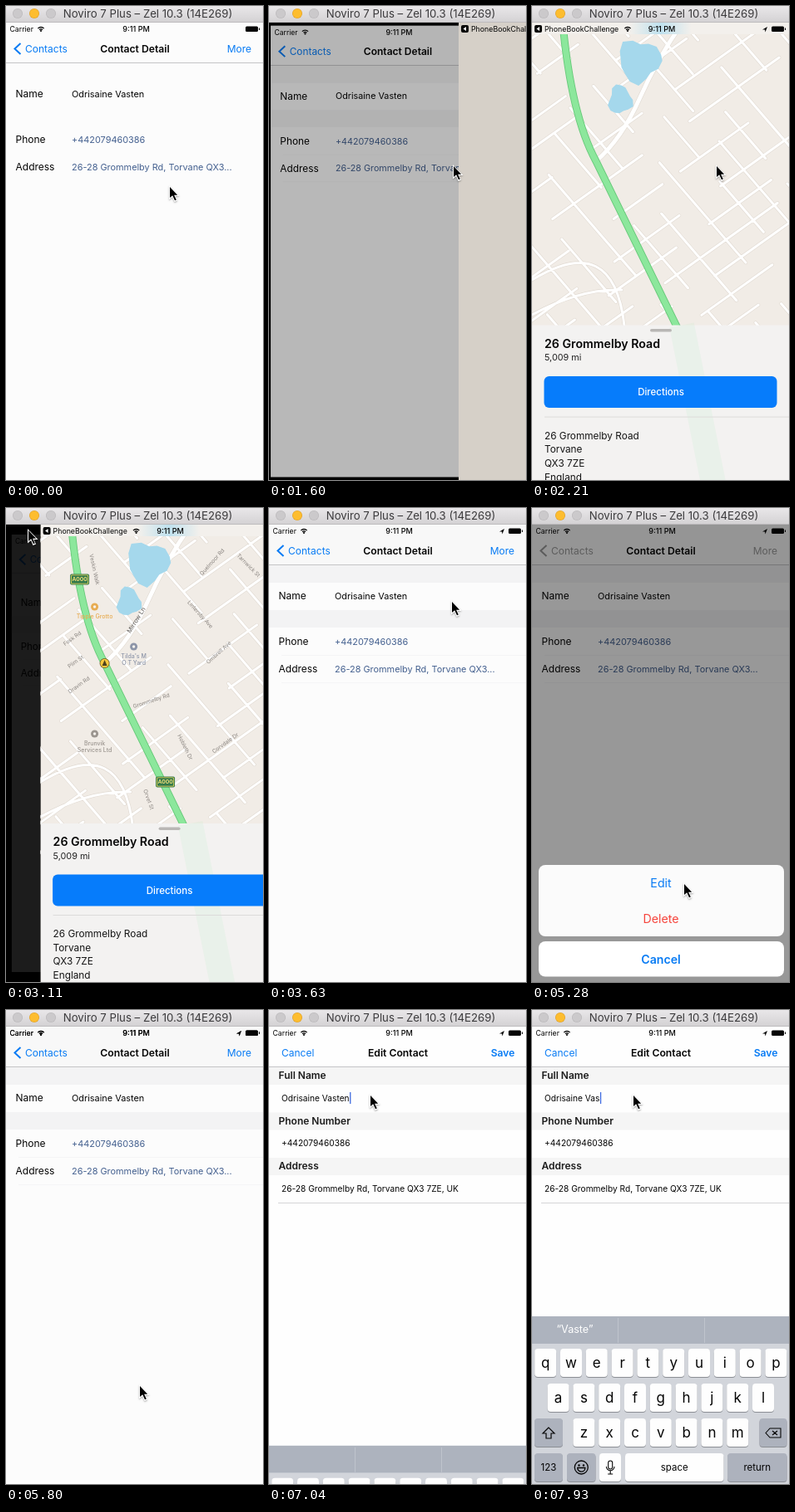
Recreate the animation shown at these times as an HTML page with a canvas. Size 309 px wide and 571 px high, loop 8000 ms.

```html
<!DOCTYPE html>
<html lang="en">
<head>
<meta charset="utf-8">
<title>Contact editing</title>
<style>
html, body { margin: 0; width: 100%; height: 100%; overflow: hidden; background: #fff; }
canvas { display: block; width: 309px; height: 571px; }
</style>
</head>
<body>
<canvas id="stage"></canvas>
<script>
const W = 309, H = 571, TOP = 20, LOOP = 8000, STEP = 87.8;
const OPEN_MAP = 1490, LEAVE_MAP = 3015, TAP_MORE = 4560, OPEN_EDIT = 5787, TAP_NAME = 7020;
const BLUE = '#087bf4', INK = '#050505', LINK = '#44608f';
const canvas = document.getElementById('stage');
const ctx = canvas.getContext('2d');
const ratio = window.devicePixelRatio || 1;
canvas.width = W * ratio;
canvas.height = H * ratio;

const person = 'Odrisaine Vasten';
const phone = '+442079460386';
const street = '26-28 Grommelby Rd, Torvane QX3';

const clamp = v => Math.max(0, Math.min(1, v));
const ramp = (t, from, to) => clamp((t - from) / (to - from));
const mix = (a, b, p) => a + (b - a) * p;
const smooth = v => v * v * (3 - 2 * v);
const easeOut = v => 1 - (1 - v) ** 3;

// Critically damped, settled once the rest is invisible.
function spring(t, start) {
  const k = Math.max(0, t - start) * 0.011;
  const p = 1 - Math.exp(-k) * (1 + k);
  return p > 0.975 ? 1 : p;
}

function randomFrom(seed) {
  return () => (seed = (seed * 16807) % 2147483647) / 2147483647;
}

function rect(x, y, w, h, color) {
  ctx.fillStyle = color;
  ctx.fillRect(x, y, w, h);
}

function pill(x, y, w, h, r, color) {
  ctx.fillStyle = color;
  ctx.beginPath();
  ctx.roundRect(x, y, w, h, r);
  ctx.fill();
}

function disc(x, y, r, color) {
  ctx.fillStyle = color;
  ctx.beginPath();
  ctx.arc(x, y, r, 0, Math.PI * 2);
  ctx.fill();
}

function fill(path, color) {
  ctx.fillStyle = color;
  ctx.fill(new Path2D(path));
}

function stroke(path, color, width) {
  ctx.strokeStyle = color;
  ctx.lineWidth = width;
  ctx.stroke(new Path2D(path));
}

// y is the middle of the capitals.
function text(str, x, y, size, color = INK, align = 'left', weight = 400) {
  ctx.font = `${weight} ${size}px Inter, "Open Sans", sans-serif`;
  ctx.textAlign = align;
  ctx.fillStyle = color;
  ctx.fillText(str, x, y + size * 0.36);
}

function titleBar() {
  const shade = ctx.createLinearGradient(0, 0, 0, TOP);
  shade.addColorStop(0, '#e9e7e9');
  shade.addColorStop(1, '#d3d1d3');
  rect(0, 0, W, TOP, shade);
  rect(0, TOP - 1, W, 1, '#bdbbbd');
  for (let i = 0; i < 3; i++) {
    disc(14 + i * 20, 9, 6, i === 1 ? '#dea02a' : '#b9b7b9');
    disc(14 + i * 20, 9, 5.4, i === 1 ? '#fdbd2f' : '#cbc9cb');
  }
  text('Noviro 7 Plus – Zel 10.3 (14E269)', 170.5, 9.5, 13.2, '#3b3a3c', 'center');
}

function wifi(x) {
  for (const r of [2.6, 5]) {
    stroke(`M${x - r * 0.73} ${30.5 - r * 0.68}A${r} ${r} 0 0 1 ${x + r * 0.73} ${30.5 - r * 0.68}`, INK, 1.3);
  }
  disc(x, 30, 1.1, INK);
}

function clock(x, y) {
  text('9:11 PM', x, y, 9.1, INK, 'center', 500);
}

function battery(x, located) {
  if (located) fill(`M${x - 11} 28.5l6 -3.5l-2.5 6.5l-.5 -3z`, INK);
  pill(x, 24.5, 15, 6.5, 1.5, INK);
  rect(x + 16, 26.5, 1, 2.5, INK);
}

function statusBar(located) {
  text('Carrier', 4.5, 28, 8.7);
  wifi(42);
  clock(156.5, 28);
  battery(288, located);
}

function contactPage(t, dim) {
  const banded = t >= OPEN_MAP;
  rect(0, TOP, W, H, '#fcfcfc');
  rect(0, TOP, W, 48, banded ? '#f8f8f8' : '#fcfcfc');
  rect(0, 68, W, 1, '#c4c4c6');
  if (banded) {
    for (const y of [69, 123]) rect(0, y, W, 21, '#f3f3f4');
    for (const y of [177, 210]) rect(15, y, W, 1, '#f5f5f6');
  }
  const tint = dim > 0.5 ? '#989898' : BLUE;
  stroke('M17.5 45l-7 6.5l7 6.5', tint, 2);
  text('Contacts', 23, 51.5, 12, tint);
  text('Contact Detail', 155, 51.5, 12.2, INK, 'center', 600);
  ctx.globalAlpha = t >= TAP_MORE && t < TAP_MORE + 2 * STEP ? 0.35 : 1;
  text('More', 295, 51.5, 12, tint, 'right');
  ctx.globalAlpha = 1;
  text('Name', 11.5, 106, 12);
  text(person, 79, 106, 10.9);
  text('Phone', 11.5, 161, 12);
  text(phone, 79, 161, 10.9, LINK);
  text('Address', 11.5, 194, 12);
  text(street + '...', 79, 194, 10.9, LINK);
  statusBar(t >= LEAVE_MAP);
}

// Broken streets in two crossing directions.
function streetGrid() {
  const random = randomFrom(29);
  let path = '';
  for (const angle of [-0.62, 0.86]) {
    const c = Math.cos(angle), s = Math.sin(angle);
    for (let side = -220; side < 220; side += 27 + random() * 16) {
      for (let along = -250; along < 250; along += 25 + random() * 50) {
        const end = along + 60 + random() * 110;
        path += `M${195 + along * c - side * s} ${200 + along * s + side * c}` +
          `L${195 + end * c - side * s} ${200 + end * s + side * c}`;
        along = end;
      }
    }
  }
  return path;
}

const roads = streetGrid() + 'M42 330Q140 270 153 385M42 372Q100 340 150 342';
const lane = 'M119 187Q150 160 172 110T230 10';
const highway = 'M78 10Q88 130 119 187L254 464';

function lake(x, y, rx, ry, turn) {
  ctx.beginPath();
  for (let a = 0; a < Math.PI * 2; a += 0.4) {
    const r = 1 + 0.16 * Math.sin(3 * a + turn) + 0.07 * Math.sin(5 * a);
    ctx.lineTo(x + rx * r * Math.cos(a), y + ry * r * Math.sin(a));
  }
  ctx.fillStyle = '#a5d8ec';
  ctx.fill();
}

function streetName(name, x, y, degrees, size = 6.6, color = '#8a8580') {
  ctx.save();
  ctx.translate(x, y);
  ctx.rotate(degrees * Math.PI / 180);
  text(name, 0, 0, size, color, 'center');
  ctx.restore();
}

function shield(x, y) {
  pill(x - 11.5, y - 6.5, 23, 13, 2, '#347a4c');
  pill(x - 10.5, y - 5.5, 21, 11, 1.5, '#f3d85a');
  pill(x - 9.7, y - 4.7, 19.4, 9.4, 1, '#347a4c');
  text('A000', x, y, 6.8, '#f8e27b', 'center', 600);
}

function place(x, y, color, ...names) {
  disc(x, y, 4.5, color);
  disc(x, y, 1.7, '#f6f2ed');
  names.forEach((name, i) => text(name, x, y + 11 + i * 8.5, 7, color, 'center', 500));
}

function mapLabels() {
  ['Fosk Rd', 'Plim St', 'Dravin Rd'].forEach((name, i) =>
    streetName(name, 80 + i * 4, 157 + i * 28, -36));
  ['Quelmoor Rd', 'Ombrell Ave', 'Corvdale Dr'].forEach((name, i) =>
    streetName(name, 248 + i * 8, 65 + i * 109, -48 + i * 6));
  streetName('Tarnwick St', 292, 69, 45);
  streetName('Lintersby Ave', 234, 128, 48);
  streetName('Hobleth Dr', 216, 288, 64);
  streetName('Orvet St', 172, 351, 70);
  streetName('Veskin Walk', 107, 74, 78);
  streetName('Fennickby Rd'.replace('Fennick', 'Grommel'), 175, 232, -18);
  streetName('Mirrow Ln', 157, 135, -58, 7.4, '#55514d');
  shield(89, 86);
  shield(192, 330);
  disc(119, 187, 6, '#6b5b2a');
  disc(119, 187, 5.2, '#f6c93f');
  fill('M116 190l3 -7l3 7z', '#4d421f');
  place(107, 119, '#e7ac52', 'Tipple Grotto');
  place(154, 167, '#8d95a8', "Tilda's M", 'O T Yard');
  place(107, 272, '#9b958f', 'Brunvik', 'Services Ltd');
}

function mapView(detail) {
  rect(42, TOP, W, H, '#f1ece6');
  ctx.lineJoin = ctx.lineCap = 'round';
  for (const [color, extra] of [['#e1dad2', 1.2], ['#fff', 0]]) {
    stroke(roads, color, 3 + extra);
    stroke(lane, color, 5 + extra);
  }
  lake(171, 66, 25, 25, 2.4);
  lake(148, 113, 14, 17, 0.6);
  stroke(highway, '#68c97a', 9);
  stroke(highway, '#8ce79c', 7.2);
  ctx.lineJoin = 'miter';
  ctx.lineCap = 'butt';
  ctx.globalAlpha = detail;
  mapLabels();
  ctx.globalAlpha = 1;
}

function placeCard(drop) {
  ctx.save();
  ctx.translate(0, drop);
  rect(42, 380, W, 200, '#f3f2f1');
  stroke('M222 380L262 580', 'rgba(150,235,165,.1)', 30);
  pill(184, 384.5, 26, 3.5, 2, '#b9b7b5');
  text('26 Grommelby Road', 57, 402, 14.2, INK, 'left', 600);
  text('5,009 mi', 57, 419, 10.8, '#222');
  pill(56.5, 441.5, 280, 38, 6, '#067cfb');
  text('Directions', 197, 460.5, 11.5, '#fff', 'center', 500);
  rect(57, 490, 294, 1, '#dcdbda');
  ['26 Grommelby Road', 'Torvane', 'QX3 7ZE', 'England']
    .forEach((row, i) => text(row, 57, 513 + i * 16.6, 11.8, '#151515'));
  ctx.restore();
}

function mapStatus(loaded) {
  if (loaded) {
    const blur = ctx.createLinearGradient(42, 0, 351, 0);
    blur.addColorStop(0.38, '#f3f0ec');
    blur.addColorStop(0.5, '#bfe1ee');
    blur.addColorStop(0.62, '#f3f0ec');
    rect(42, TOP, W, 14, blur);
    wifi(157);
    clock(198, 27.5);
    battery(330, true);
  }
  pill(45, 23, 9, 9, 2, INK);
  fill('M51 25v5l-3.5 -2.5z', '#fff');
  text('PhoneBookChallenge', 57, 27.5, 8.8);
}

function mapApp(t, x) {
  ctx.save();
  ctx.beginPath();
  ctx.rect(x, TOP, W, H);
  ctx.clip();
  ctx.translate(x - 42, 0);
  rect(42, TOP, W, H, '#d6d0c8');
  const shown = ramp(t, 1900, 2120);
  if (shown) {
    ctx.globalAlpha = shown;
    mapView(ramp(t, 2300, 2540));
    placeCard(200 * (1 - easeOut(ramp(t, 1980, 2280))));
  }
  mapStatus(shown > 0);
  ctx.restore();
}

function actionSheet(rise) {
  rect(0, TOP, W, H, `rgba(0,0,0,${0.4 * rise})`);
  ctx.save();
  ctx.translate(0, 145 * (1 - rise));
  pill(8, 430, 295, 86, 8, '#fbfbfb');
  pill(8, 522, 295, 42.5, 8, '#fff');
  text('Edit', 155, 452, 14.2, BLUE, 'center');
  text('Delete', 155, 495, 14.2, '#f6443c', 'center');
  text('Cancel', 155, 543.5, 14.2, BLUE, 'center', 600);
  ctx.restore();
}

function key(x, y, w, label, dark, size = 11.5) {
  pill(x, y + 1, w, 34, 4, '#8b8e94');
  pill(x, y, w, 34, 4, dark ? '#adb2bd' : '#fefefe');
  text(label, x + w / 2, y + 17, size, INK, 'center');
}

function keyboard(rise, hint) {
  ctx.save();
  ctx.translate(0, 202 * (1 - rise));
  rect(0, 369, W, 33, '#adb3be');
  rect(0, 402, W, 170, '#d2d5db');
  for (const x of [103, 207]) rect(x, 371, 1, 30, '#bfc4cd');
  if (hint) text(`“${hint}”`, 51.5, 384, 12.6, '#fff', 'center');
  ['qwertyuiop', 'asdfghjkl', 'zxcvbnm'].forEach((row, i) => {
    const left = 157.2 - row.length * 15.4;
    [...row].forEach((c, j) => key(left + j * 30.8, 408 + i * 42, 26, c, false, 17));
  });
  key(3, 492, 34, '', true);
  stroke('M20 503l-7 7h4v6h6v-6h4z', INK, 1.2);
  key(273.5, 492, 33, '', true);
  stroke('M281 509.5l5 -5.5h13v11h-13zM289 507l6 5m0 -5l-6 5', INK, 1.1);
  key(3, 534, 34, '123', true);
  key(42, 534, 34.5, '', true);
  stroke('M51.3 551a8 8 0 0 0 16 0a8 8 0 0 0 -16 0M54.7 551.5h9.2a4.6 4.6 0 0 1 -9.2 0z', INK, 1.3);
  for (const x of [56.5, 62]) disc(x, 548.5, 1.2, INK);
  key(81, 534, 26, '');
  stroke('M91.7 545.5a2.5 2.5 0 0 1 5 0v5a2.5 2.5 0 0 1 -5 0zM89.4 550a4.8 4.8 0 0 0 9.6 0M94.2 555v4m-3 0h6', INK, 1.1);
  key(112, 534, 118.5, 'space');
  key(235, 534, 71.5, 'return', true);
  ctx.restore();
}

function editPage(t, y) {
  const erased = Math.max(0, Math.min(3, Math.floor((t - 7400) / 166)));
  const typed = person.slice(0, person.length - erased);
  ctx.save();
  ctx.translate(0, y);
  rect(0, TOP, W, H, '#fefefe');
  rect(0, 68, W, 1, '#c4c4c6');
  text('Cancel', 15, 51.5, 12, BLUE);
  text('Edit Contact', 155, 51.5, 12.2, INK, 'center', 600);
  text('Save', 295.5, 51.5, 12.2, BLUE, 'right', 600);
  const rows = [['Full Name', typed], ['Phone Number', phone], ['Address', street + ' 7ZE, UK']];
  rows.forEach(([label, value], i) => {
    const top = 69 + i * 54.5;
    rect(0, top, W, 21, '#f5f5f5');
    text(label, 11.5, top + 10, 12, '#1c1c1c', 'left', 600);
    text(value, 15, top + 37, 10.2);
    if (i === 0 && t >= TAP_NAME) rect(15.5 + ctx.measureText(value).width, 99, 1.3, 14, '#3f6be0');
  });
  rect(11, 232, W, 1, '#d5d5d7');
  ctx.restore();
  // The suggestion lags behind the field.
  const hint = erased > 1 ? 'Vasten'.slice(0, 8 - erased) : '';
  if (t >= TAP_NAME) keyboard(easeOut(ramp(t, TAP_NAME - 30, 7400)), hint);
}

function pointerAt(t) {
  let x = 197, y = 218;
  const move = (from, to, nextX, nextY) => {
    const p = smooth(ramp(t, from, to));
    x = mix(x, nextX, p);
    y = mix(y, nextY, p);
  };
  move(560, 1140, 222, 193);
  move(2700, LEAVE_MAP, 27, 27);
  move(3080, 3510, 220, 113);
  move(3720, 4210, 276, 47);
  move(4800, 5180, 183, 453);
  move(5390, 5710, 161, 453);
  move(6140, 6760, 122, 103);
  return [x, y];
}

function pointer(t) {
  ctx.save();
  ctx.translate(...pointerAt(t));
  ctx.shadowColor = 'rgba(0,0,0,.35)';
  ctx.shadowBlur = 2 * ratio;
  ctx.shadowOffsetY = ratio;
  fill('M-1 -2v17.5l4 -3.5l2.5 6l3.5 -1.5l-2.5 -5.5h5z', '#fff');
  ctx.shadowColor = 'transparent';
  fill('M0 0v13l3.2 -2.8l2.8 6.1l1.8 -.8l-2.7 -5.7h4.1z', '#000');
  ctx.restore();
}

function draw(t) {
  ctx.setTransform(ratio, 0, 0, ratio, 0, 0);
  const cover = t < LEAVE_MAP ? spring(t, OPEN_MAP) : 1 - spring(t, LEAVE_MAP);
  const sheet = easeOut(ramp(t, 4680, 5090)) * (1 - smooth(ramp(t, 5360, 5700)));
  const modal = spring(t, OPEN_EDIT);

  rect(0, 0, W, H, '#000');
  ctx.save();
  const scale = 1 - 0.05 * cover, middle = (TOP + H) / 2;
  ctx.translate(W / 2, middle);
  ctx.scale(scale, scale);
  ctx.translate(-W / 2, -middle);
  ctx.beginPath();
  ctx.rect(0, TOP, W, H - TOP);
  ctx.clip();
  contactPage(t, sheet);
  ctx.restore();

  if (cover) {
    rect(0, TOP, W, H, `rgba(0,0,0,${Math.min(1, cover * 1.03)})`);
    mapApp(t, W * (1 - cover));
  }
  if (sheet) actionSheet(sheet);
  if (modal) {
    editPage(t, (H - TOP) * (1 - modal));
    statusBar(true);
  }
  titleBar();
  pointer(t);
}

function tick(now) {
  const t = now % LOOP;
  draw(Math.floor(t / STEP) * STEP);
  requestAnimationFrame(tick);
}
draw(0);
requestAnimationFrame(tick);
</script>
</body>
</html>
```
